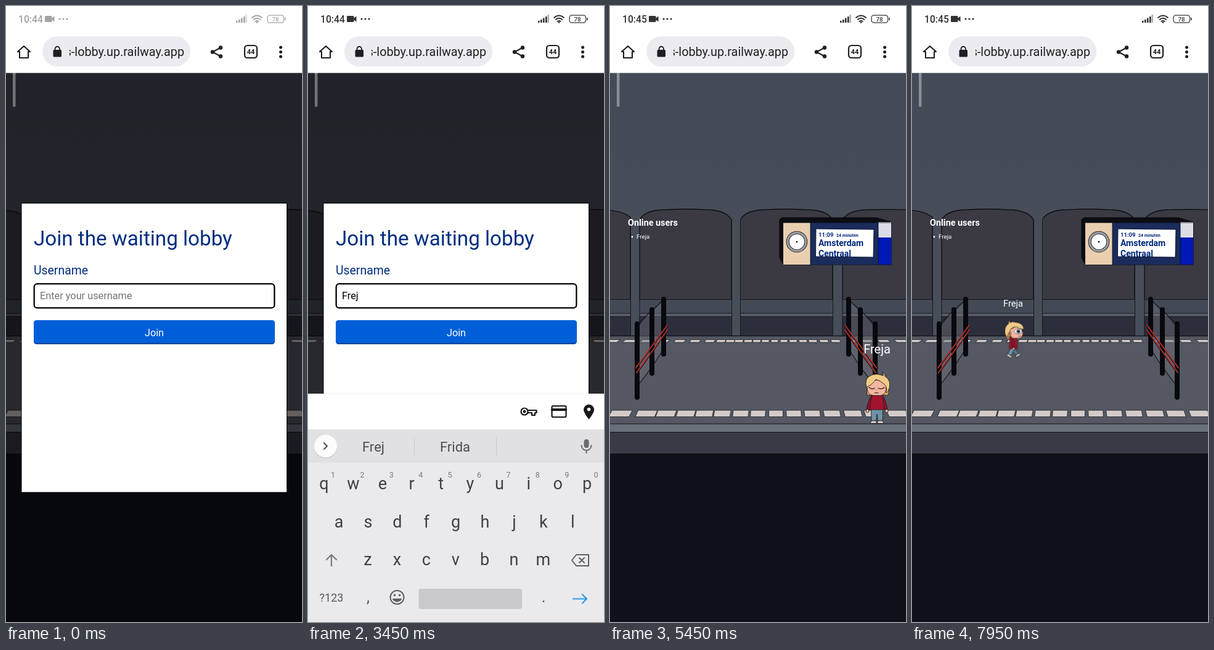
Write an HTML page that moves like this. It is 480x998 px and loops after 8 s.

```html
<!DOCTYPE html>
<html lang="en">
<head>
<meta charset="utf-8">
<title>Waiting lobby</title>
<style>
html, body { margin: 0; width: 100%; height: 100%; overflow: hidden; background: #fff; }
svg { display: block; width: 100vw; height: 100vh; font-family: Roboto, sans-serif; }
.mid { text-anchor: middle; }
.ln { fill: none; stroke-linecap: round; stroke-linejoin: round; }
#status { animation: status 8s linear infinite; }
#keyboard { animation: slide 8s infinite; }
#strip { animation: strip 8s linear infinite; }
#chips { animation: chips 8s linear infinite; }
#player { animation: walk 8s infinite; }
#side { animation: face 8s step-end infinite; }
.leg { transform-origin: 0 -21px; animation: leg .4s -.05s ease-in-out infinite; }
.leg.b { animation-delay: -.25s; }
@keyframes status { 0%, 4.4% { opacity: .45 } 7.5%, 100% { opacity: 1 } }
@keyframes slide {
  0%, 15.6% { transform: translateY(372px); animation-timing-function: ease-out }
  17.5%, 54.4% { transform: none; animation-timing-function: ease-in }
  57.5%, 100% { transform: translateY(372px) }
}
@keyframes strip {
  0%, 17.5% { opacity: 0 } 18.125% { opacity: .42 } 20%, 54.4% { opacity: 1 } 56%, 100% { opacity: 0 }
}
@keyframes chips { 0%, 17.5% { transform: translateX(14px) } 18.125% { transform: translateX(9px) } 20%, 100% { transform: none } }
@keyframes walk {
  0%, 78.75% { transform: translate(433px, 676px) scale(1); animation-timing-function: ease-in-out }
  93.75%, 100% { transform: translate(164px, 570.5px) scale(.735) }
}
@keyframes face { 0% { transform: none } 93.75% { transform: scaleX(-1) } }
@keyframes leg { 0%, 100% { transform: rotate(-32deg) } 50% { transform: rotate(32deg) } }
</style>
</head>
<body>
<svg viewBox="0 0 480 998" preserveAspectRatio="none">
<defs>
  <linearGradient id="fade"><stop stop-color="#fff" stop-opacity="0"/><stop offset="1" stop-color="#fff"/></linearGradient>
  <linearGradient id="sky" x2="0" y2="1"><stop stop-color="#444b57"/><stop offset="1" stop-color="#49505c"/></linearGradient>
  <clipPath id="urlClip"><path d="M103 55h190v40h-190z"/></clipPath>
  <g id="fence">
    <path d="M48 517 64 497V587L48 610zM72 493 83 480V560L72 580z" fill="#6d7078" opacity=".45"/>
    <path d="M44 517 68 493 87 476M46 614 68 585 86 557" class="ln" stroke="#14151a" stroke-width="1.2"/>
    <path d="M44 515V634M68 492V595M87 475V564" class="ln" stroke="#08090d" stroke-width="8"/>
    <path d="M42 587 93 518M43 595 93 526" class="ln" stroke="#1a1013" stroke-width="2.6"/>
    <path d="M42 586 93 517M43 594 93 525" class="ln" stroke="#c5332d" stroke-width="1.6"/>
  </g>
</defs>

<g id="scene">
  <path d="M0 108h480v431H0z" fill="url(#sky)"/>
  <g fill="#3b3a43" stroke="#0d0e12" stroke-width="1.3">
    <path d="M-2 331Q20 332 33 342V476H-2z"/>
    <path d="M48 346Q58 330 90 330Q122 328 155 330Q187 330 197 346V476H48z"/>
    <path d="M211 346Q221 330 253 330Q285 328 318 330Q351 330 361 346V476H211z"/>
    <path d="M377 346Q387 330 420 330Q452 329 482 330V476H377z"/>
  </g>
  <path d="M0 476h480v22H0z" fill="#434a55"/>
  <path d="M0 498h480v5H0z" fill="#5a616d"/>
  <path d="M0 503h480v31H0z" fill="#2c2e3b"/>
  <path d="M0 475.5H480M0 498H480M0 503H480" stroke="#14161b" stroke-width="1"/>
  <path d="M33.500 342h14v192h-14zM197.500 342h14v192h-14zM361.500 342h15v192h-15z" fill="#474e5a"/>
  <path d="M33.500 342v192M48 346v188M197.500 346v188M211.500 346v188M361.500 346v188M377 346v188" stroke="#15171c"/>
  <path d="M0 534h480v143H0z" fill="#545862"/>
  <path d="M0 534.500H480" stroke="#15171c" stroke-width="1.300"/>
  <g id="tiles" fill="#d3cbca" stroke="#1b1c20" stroke-width=".8"></g>
  <path d="M0 677h480v13H0z" fill="#69707b"/>
  <path d="M0 690h480v35H0z" fill="#383a45"/>
  <path d="M0 725h480v273H0z" fill="#0e1119"/>
  <path d="M0 677H480M0 690.500H480M0 725.500H480" stroke="#121318" stroke-width="1.200"/>
  <use href="#fence"/><use href="#fence" transform="matrix(-1 0 0 1 474 0)"/>
  <g data-on="4150 8000">
    <path d="M275 346 279 343H432L456 350V419H281L275 408z" fill="#0c0d12" stroke="#050508"/>
    <path d="M281 351h44v68h-44z" fill="#e9cfb0"/>
    <path d="M325 351h110v68H325z" fill="#192c5b"/>
    <path d="M435 350h21v25h-21z" fill="#dcdce7"/><path d="M435 375h21v44h-21z" fill="#0019b5"/>
    <path d="M281 351H456M325 351V419M435 351V419" stroke="#0a0c14" stroke-width=".8"/>
    <path d="M334 361 428 362 427 407 333.500 406z" fill="#fff" stroke="#0b1433"/>
    <circle cx="303" cy="382" r="14.800" fill="#fff" stroke="#111" stroke-width="5"/>
    <circle cx="303" cy="382" r="14.800" fill="none" stroke="#9b9ca0" stroke-width="3.400"/>
    <circle cx="303" cy="382" r="1.300"/>
    <g fill="#00287c" font-weight="700">
      <text x="338" y="373.500" font-size="9.500">11:09</text><text x="367" y="373.500" font-size="7">24 minuten</text>
      <text x="338" y="389" font-size="14">Amsterdam</text><text x="338" y="406" font-size="14">Centraal</text>
    </g>
    <text x="29" y="355.500" font-size="14.400" font-weight="700" fill="#fff">Online users</text>
  </g>
  <g data-on="4600 8000" fill="#fff"><circle cx="36" cy="374" r="1.400"/><text x="43" y="377" font-size="9.800">Freja</text></g>
</g>

<g id="player">
  <text class="mid" y="-113" font-size="20" fill="#fff" data-on="4600 8000">Freja</text>
  <g data-on="4600 6300" stroke="#2a1a1c" stroke-width=".9" stroke-linejoin="round">
    <path d="M-9-4H-1V0H-11zM1-4H9L11 0H1z" fill="#e8e3e2"/>
    <path d="M-9.500-23H9.500L9-4H1.500L0-15L-1.500-4H-9z" fill="#6d92a6"/>
    <circle cx="-15.500" cy="-20" r="2.600" fill="#f2b39f"/><circle cx="15.500" cy="-20" r="2.600" fill="#f2b39f"/>
    <path d="M-9-45Q-14-38-17-23L-13-22-8-34zM9-45Q14-38 17-23L13-22 8-34z" fill="#8f1029"/>
    <path d="M-8-46H8Q11-36 11.500-22H-11.500Q-11-36-8-46z" fill="#a2132e"/>
    <path d="M-14-60Q-19-50-15-45L-8-46H10L17-45Q22-52 17-64z" fill="#d9ae68"/>
    <path d="M-16-60Q-17-46-6-45H6Q15-46 15-60Q10-72-4-70Q-14-68-16-60z" fill="#f4b6a0"/>
    <path d="M-17-58Q-21-72-11-77Q-2-82 10-77Q11-82 8-83Q13-82 13-76Q23-70 20-57Q18-50 15-49Q17-58 12-63Q6-69-2-71Q-6-64-17-58z" fill="#efcb86"/>
    <path d="M-13-58Q-8-54-4-57M2-57Q7-54 12-58M-4-49Q-1-50 2-49" class="ln" stroke-width="1.200"/>
    <path d="M-3-54Q-1-52 1-54" class="ln" stroke="#d17a70"/>
  </g>
  <g id="side">
    <g data-on="6300 8000" stroke="#2a1a1c" stroke-width=".9" stroke-linejoin="round">
      <g class="leg b"><path d="M-4-23H4L3-5H-4z" fill="#52788e"/><path d="M-8-1Q-7-5-3-5H4V-1z" fill="#d8d3d3"/></g>
      <g class="leg"><path d="M-4-23H5L4-5H-4z" fill="#6d92a6"/><path d="M-8-1Q-7-5-3-5H4V-1z" fill="#e8e3e2"/></g>
      <path d="M-7-46H6Q9-34 8-21H-9Q-10-35-7-46z" fill="#a2132e"/>
      <path d="M-2-41H4L2-23H-4z" fill="#8f1029"/><circle cx="-1" cy="-21" r="2.600" fill="#f2b39f"/>
      <path d="M5-64Q18-62 17-50Q14-41 8-40Q10-45 5-50z" fill="#c08a5a"/>
      <path d="M-19-67Q-20-62-20-58Q-24-56-21-53Q-21-45-13-44H0Q8-47 8-62L-6-70z" fill="#f4b6a0"/>
      <path d="M-24-64Q-21-78-6-79Q4-81 6-78Q9-81 6-83Q11-82 10-76Q20-69 18-56Q17-48 11-46Q14-53 8-57Q7-63 3-66Q-3-70-9-69Q-14-64-24-64z" fill="#efcb86"/>
      <ellipse cx="-11" cy="-59" rx="8.500" ry="5.800" fill="#fff"/>
      <circle cx="-11.500" cy="-59" r="3.800" fill="#4e7fae"/><circle cx="-12" cy="-59" r="1.800" fill="#111"/>
      <path d="M-18-48.500H-12" class="ln"/><path d="M4-58Q8-59 7-54Q5-52 3-54" fill="#f0a893"/>
    </g>
  </g>
</g>

<g data-on="0 4150">
  <path d="M0 108h480v890H0z" opacity=".53"/>
  <path d="M25 319.500h430.500V788H25z" fill="#fff" stroke="#000"/>
  <g fill="#002d80">
    <text x="45" y="388" font-size="33.200">Join the waiting lobby</text>
    <text x="45" y="434.500" font-size="19.400">Username</text>
  </g>
  <rect x="45.700" y="450.200" width="389.600" height="39" rx="5" fill="#fff" stroke="#050505" stroke-width="2.300"/>
  <rect x="45" y="510" width="391" height="38" rx="4.500" fill="#0a449c"/>
  <rect x="45" y="509" width="391" height="37" rx="4.500" fill="#005fd8"/>
  <text class="mid" x="240.500" y="534.500" font-size="16.200" fill="#fff">Join</text>
</g>
<text x="55" y="475" font-size="16.300" fill="#757575" data-on="0 2750">Enter your username</text>
<text x="55" y="475" font-size="16.300" class="typed" data-end="4150"></text>
<rect x="11" y="105" width="4.500" height="58.500" rx="2" fill="#fff" opacity=".37"/>

<path d="M0 0h480v108.500H0z" fill="#fff"/>
<g id="status" fill="#333">
  <g font-size="15.700" font-weight="500"><text x="20" y="27" data-on="0 3900">10:44</text><text x="20" y="27" data-on="3900 8000">10:45</text></g>
  <path d="M64 16h9q1.500 0 1.500 1.500V19.500l4-3v9l-4-3V24.500q0 1.500-1.500 1.500h-9q-1 0-1-1v-8q0-1 1-1z"/>
  <circle cx="87" cy="21" r="1.600"/><circle cx="93" cy="21" r="1.600"/><circle cx="99" cy="21" r="1.600"/>
  <path d="M373 24h2.600v3H373zM377 22h2.600v5H377zM381 19.500h2.600V27H381zM385 17h2.600v10H385z"/><path d="M388.600 14h2.200v13h-2.200z" opacity=".45"/>
  <path d="M399 19Q407 12 415 19M401.700 22Q407 17.500 412.300 22M404.300 25Q407 22.700 409.700 25" class="ln" stroke="#333" stroke-width="1.800"/><circle cx="407" cy="26.500" r="1.400"/>
  <rect x="424" y="15" width="26.500" height="12" rx="3.800" fill="none" stroke="#555" stroke-width="1.500"/><path d="M452 19h1.600v4H452z"/>
  <text class="mid" x="437" y="24.700" font-size="9.800" font-weight="500">78</text>
</g>
<rect x="59" y="49" width="240" height="49" rx="24.500" fill="#ecebf0"/>
<g fill="#1f1f23">
  <path d="M29 65 39 74H36V84H22V74H19z" class="ln" stroke="#1f1f23" stroke-width="2.100"/>
  <rect x="76.500" y="71" width="13.500" height="11.500" rx="1.500"/><path d="M79.500 72V69.500a3.700 3.700 0 0 1 7.400 0V72" class="ln" stroke="#1f1f23" stroke-width="1.900"/>
  <text x="289" y="81" text-anchor="end" font-size="19.800" clip-path="url(#urlClip)">s-lobby.up.railway.app</text>
  <path d="M348 67.500 335 74.500 348 81.500" class="ln" stroke="#1f1f23" stroke-width="2"/>
  <circle cx="348" cy="67.500" r="3.200"/><circle cx="335" cy="74.500" r="3.200"/><circle cx="348" cy="81.500" r="3.200"/>
  <rect x="387" y="64" width="20" height="20" rx="4.500" fill="none" stroke="#1f1f23" stroke-width="2.200"/>
  <text class="mid" x="397" y="78" font-size="11" font-weight="700">44</text>
  <circle cx="445.500" cy="67" r="2.500"/><circle cx="445.500" cy="74.500" r="2.500"/><circle cx="445.500" cy="82" r="2.500"/>
</g>

<g id="strip">
  <path d="M0 628h480v58H0z" fill="#fff"/>
  <path d="M0 627h480v1H0z" opacity=".06"/>
  <g id="chips"></g>
  <path d="M396 630h84v54h-84z" fill="url(#fade)" data-on="1400 2750"/>
  <g data-on="2750 4600" class="ln" stroke="#17171a" stroke-width="2.200">
    <circle cx="351" cy="657" r="5.500"/><circle cx="351" cy="657" r="1.300" fill="#17171a"/><path d="M356.500 655H370.500V659H368V663H363V659H356.500"/>
    <rect x="395.500" y="648" width="23" height="18" rx="2"/><path d="M396 654H418" stroke-width="4"/>
    <path d="M455.500 669Q447.500 659 447.500 654a8 8 0 0 1 16 0Q463.500 659 455.500 669z" fill="#17171a" stroke-width="1"/><circle cx="455.500" cy="653.500" r="2.800" fill="#fff" stroke="none"/>
  </g>
</g>

<g id="keyboard">
  <path d="M0 686h480v312H0z" fill="#fff" data-on="1250 4600"/>
  <g data-on="1500 4600">
    <path d="M0 686h480v54H0z" fill="#e1e1e3"/><path d="M0 740h480v258H0z" fill="#eaeaec"/>
    <circle cx="28.500" cy="714.500" r="18.500" fill="#000" opacity=".1"/><circle cx="28.500" cy="713" r="18.500" fill="#fcfcfc"/>
    <rect x="447.500" y="702" width="8" height="14" rx="4" fill="#6a6b6e"/>
    <path d="M443.500 712a8 8 0 0 0 16 0M451.500 720V724" class="ln" stroke="#6a6b6e" stroke-width="2"/>
    <g fill="#55565a" font-size="18"><text class="mid" x="38" y="965">?123</text><text class="mid" x="97.500" y="966" font-size="25">,</text><text class="mid" x="382" y="966" font-size="25">.</text></g>
    <rect x="179.500" y="944" width="167.500" height="33" rx="4" fill="#cacacc"/>
    <g class="ln" stroke="#606165" stroke-width="2">
      <circle cx="144.500" cy="958" r="11"/><path d="M138 961Q144.500 968 151 961z" fill="#606165"/>
      <path d="M435 889H455V907H435L428 898zM440 894 448 902M448 894 440 902"/>
    </g>
    <circle cx="140.500" cy="954.500" r="1.800" fill="#606165"/><circle cx="148.500" cy="954.500" r="1.800" fill="#606165"/>
    <path d="M430 960.500H452M445 953.500 452 960.500 445 967.500" class="ln" stroke="#2b9bee" stroke-width="2.200"/>
  </g>
  <g data-on="1500 2750">
    <rect x="5" y="873" width="66" height="50" rx="5" fill="#c2c2c4"/>
    <path d="M38 907V889M30 897 38 889 46 897" class="ln" stroke="#2b9bee" stroke-width="2.200"/>
    <path d="M31 708 26 713 31 718" class="ln" stroke="#55565a" stroke-width="2.200"/>
    <g class="ln" stroke="#7b7c80" stroke-width="2.200">
      <path d="M87 703H105Q106.500 703 106.500 705V716L99 723.500H87Q85.500 723.500 85.500 722V705Q85.500 703 87 703zM106 716H99V723M91 715Q95 720 99 715"/>
      <rect x="223" y="704.500" width="17" height="19" rx="2"/><path d="M228 704H235M227 711H236M227 715H236M227 719H233"/>
      <circle cx="298.500" cy="713" r="5.500" stroke-width="5"/><circle cx="298.500" cy="713" r="9" stroke-width="3" stroke-dasharray="3 6.425" stroke-linecap="butt"/>
    </g>
    <g fill="#7b7c80">
      <text class="mid" x="163.500" y="719" font-size="16" font-weight="900">GIF</text>
      <circle cx="92" cy="710" r="1.700"/><circle cx="100" cy="710" r="1.700"/>
      <circle cx="376" cy="713" r="2.200"/><circle cx="383" cy="713" r="2.200"/><circle cx="390" cy="713" r="2.200"/>
    </g>
    <path d="M341 700V726" stroke="#c9c9cc"/>
  </g>
  <g data-on="2750 4600">
    <path d="M38 907V889M30 897 38 889 46 897" class="ln" stroke="#77787b" stroke-width="2.200"/>
    <path d="M26 708 31 713 26 718" class="ln" stroke="#55565a" stroke-width="2.200"/>
    <path d="M172.500 698V728M305.500 698V728" stroke="#cbcbce"/>
  </g>
  <g class="mid" fill="#4d4e52" font-size="22">
    <text x="112" y="722" class="typed" data-end="4600"></text>
    <text x="238.500" y="722" data-on="2950 4600">Frida</text>
    <g data-on="3550 4600"><text x="364.500" y="705" font-size="17" font-weight="500">frejawinkel</text><text x="364.500" y="725" font-size="14.500">@example.com</text></g>
  </g>
  <g id="keys" class="mid" fill="#404145" font-size="27"></g>
</g>
</svg>
<script>
const NS = 'http://www.w3.org/2000/svg', LOOP = 8000;
const $ = s => document.querySelector(s);
const add = (parent, tag, attrs, text = '') => {
  const el = document.createElementNS(NS, tag);
  for (const k in attrs) el.setAttribute(k, attrs[k]);
  el.textContent = text;
  return parent.appendChild(el);
};

// Platform edge tiles, wider and leaning more away from the vanishing point
const tileRow = (xs, top, h, width, grow, lean) => xs.forEach(x => {
  const w = width + Math.abs(x - 269) * grow, s = (269 - x) * lean;
  add($('#tiles'), 'path', { d: `M${x - w / 2 + s} ${top}h${w}L${x + w / 2 - s} ${top + h}h${-w}z` });
});
tileRow([4, 32, 60, 86, 113, 138, 162, 180, 195, 209, 224, 238, 252, 267, 282, 297, 313, 329, 347, 366, 390, 417, 444, 472], 540.5, 4.5, 11.5, .032, .012);
tileRow([17, 59, 91, 123, 153, 182, 212, 240, 269, 298, 328, 360, 394, 428, 466], 655, 10.5, 23, .04, .011);

// Autofill chips: label, left edge, width, time of removal
[['Fria', 10, 75, 3150], ['Frida', 96, 82, 3150], ['Gkgks', 188.5, 90, 2750], ['Bkbke', 289.5, 92, 2750], ['Gkgk', 392, 81, 2750]]
  .forEach(([name, x, w, end]) => {
    const g = add($('#chips'), 'g', { 'data-on': `1400 ${end}` });
    add(g, 'rect', { x, y: 638.5, width: w, height: 38, rx: 19, fill: '#fff', stroke: '#828286', 'stroke-width': 1.3 });
    add(g, 'text', { x: x + w / 2, y: 663, class: 'mid', 'font-size': 17.5, 'font-weight': 500, fill: '#3c3d41' }, name);
  });

// Letter keys
const keys = $('#keys'), spot = {};
[['qwertyuiop', 26, 785], ['asdfghjkl', 50, 846.5], ['zxcvbnm', 97, 907.5]].forEach(([row, x0, y], r) =>
  [...row].forEach((c, i) => {
    const x = x0 + 47.4 * i;
    spot[c] = [x, y];
    add(keys, 'text', { x, y, 'data-on': '1500 2750' }, c.toUpperCase());
    add(keys, 'text', { x, y: y - 2, 'data-on': '2750 4600' }, c);
    if (!r) add(keys, 'text', { x: x + 14.5, y: 763.5, 'font-size': 12.5, fill: '#77787b', 'data-on': '1500 4600' }, (i + 1) % 10);
  }));

// Typing with key previews
[...'Freja'].forEach((c, i) => {
  const t = 2750 + 200 * i, [x, y] = spot[c.toLowerCase()];
  document.querySelectorAll('.typed').forEach(el => add(el, 'tspan', { 'data-on': `${t} ${el.dataset.end}` }, c));
  const g = add(keys, 'g', { 'data-on': `${t - 50} ${t + 100}` });
  add(g, 'rect', { x: x - 23, y: y - 78, width: 46, height: 98, rx: 6, fill: '#f8f8f9', stroke: '#d4d4d7' });
  add(g, 'text', { x, y: y - 42, 'font-size': 30 }, c);
});

// data-on="from to" in ms becomes a hard on/off keyframe rule
const rules = new Map();
document.querySelectorAll('[data-on]').forEach(el => {
  const [a, b] = el.dataset.on.split(' ').map(Number), name = `on${a}-${b}`;
  rules.set(name, `@keyframes ${name}{0%{visibility:hidden}${a / LOOP * 100}%{visibility:visible}${b / LOOP * 100}%,100%{visibility:hidden}}`);
  el.style.animation = `${name} ${LOOP}ms step-end infinite`;
});
document.head.appendChild(document.createElement('style')).textContent = [...rules.values()].join('');
</script>
</body>
</html>
```
